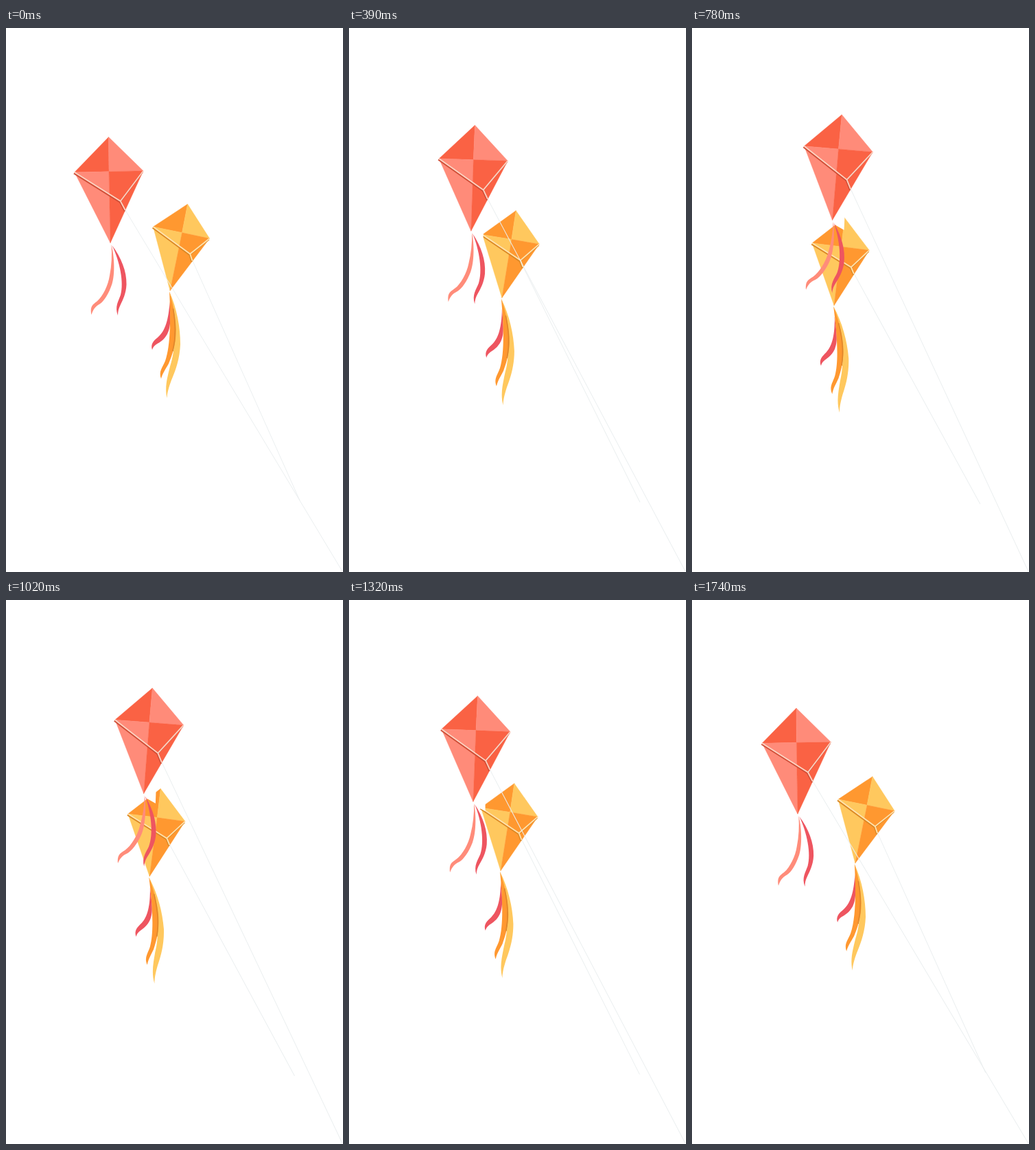
Write an HTML page that moves like this. It is 491 px wide and 791 px high and loops after 1770 ms.

```html
<!DOCTYPE html>
<html lang="en">
<head>
<meta charset="utf-8">
<title>Kites</title>
<style>
  html, body { margin: 0; width: 100%; height: 100%; overflow: hidden; background: #fff; }
  svg { display: block; width: 491px; height: 791px; }
  .string, .bridle, .shade { fill: none; stroke-linejoin: round; }
  .string { stroke: #ebeff0; stroke-width: 1; }
  .bridle { stroke-width: 1.8; }
  .shade { stroke-width: 2; }
</style>
</head>
<body>
<svg viewBox="0 0 491 791">
  <g id="yellow">
    <path class="string" d="M271 336.500L428 687"/>
    <path fill="#ee5560" d="M238.500 398C240 425 240 435 235 445C230 454 224 457 219 460C215 463 214 465 213 468C210 459 216 454 222 449C232 440 237 424 238.500 398Z"/>
    <path fill="#ffc85e" d="M238 383C249 408 254 435 254 460C253 482 247 498 241 512C237 523 235 530 234.500 538C231 522 235 508 239 492C249 462 247 420 238 383Z"/>
    <path fill="#ff9830" d="M238 383C246 410 249 434 247 452C245 468 241 478 237 488C232 497 228 502 226 510C222 499 228 494 232 484C240 462 240 420 238 383Z"/>
    <path fill="none" stroke="#de872c" stroke-width="1.6" d="M243.500 408C247 430 248 448 243 470"/>
    <g id="yellowSail"></g>
  </g>
  <g id="red">
    <path fill="#fff" d="M152 312L158 319.500L170.500 325L169 300L160 290Z"/>
    <path fill="#ff8c7a" d="M153.500 315C158 332 159 358 154.500 372C150 386 143 397 137 401C130 405 127 409 124.500 417C122 404 127 402 133 397C141 390 149 374 151 360C154 345 154.500 330 153.500 315Z"/>
    <path fill="#ee5560" d="M154.500 316C168 334 176 354 175.500 373C175 386 170 396 167 402C164 408 163 412 163 418C158 405 164 397 167 388C172 370 166 340 154.500 316Z"/>
    <path class="string" d="M174 265L490 790"/>
    <g id="redSail"></g>
  </g>
</svg>
<script>
const STEP = 30, RISE = 29, STEPS = 59;
const byId = id => document.getElementById(id);

function sail({ top, right, bottom, left, center, knot, end, dark, light, cord, shade }) {
  const tri = (a, b, fill) =>
    `<path fill="${fill}" stroke="${fill}" stroke-width=".4" d="M${a}L${b}L${center}Z"/>`;
  const cords = (cls, color, shift) =>
    `<path class="${cls}" stroke="${color}" transform="translate(${shift})" d="M${left}L${knot}L${right}M${knot}L${end}"/>`;
  return tri(left, top, dark) + tri(top, right, light) +
    tri(bottom, left, light) + tri(right, bottom, dark) +
    cords("shade", shade, "-0.9 1.5") + cords("bridle", cord, "0 0");
}

byId("redSail").innerHTML = sail({
  top: [149.5, 158.5], right: [200, 207.7], bottom: [152, 312.5], left: [99.8, 209.8],
  center: [150, 208.7], knot: [166.8, 251.8], end: [173.8, 265],
  dark: "#fa6244", light: "#ff8b79", cord: "#fbd3c2", shade: "#cf4f38"
});
byId("yellowSail").innerHTML = sail({
  top: [264.6, 256], right: [296.6, 306], bottom: [239, 382], left: [214.4, 289],
  center: [256.5, 297.5], knot: [268.2, 328.5], end: [271.5, 338.5],
  dark: "#ff9830", light: "#ffc85e", cord: "#ffe2ae", shade: "#da8826"
});

// Both kites swing about the hand that holds the strings.
function swing(id, degrees) {
  byId(id).setAttribute("transform", `rotate(${degrees} 490 790)`);
}

function draw(ms) {
  const step = Math.floor(ms / STEP) % STEPS;
  const sweep = step < RISE ? step / RISE : (STEPS - step) / (STEPS - RISE);
  swing("red", 6.78 * sweep);
  swing("yellow", -5.15 * sweep);
}

const start = performance.now();
function tick() {
  draw(performance.now() - start);
  requestAnimationFrame(tick);
}
tick();
</script>
</body>
</html>
```
